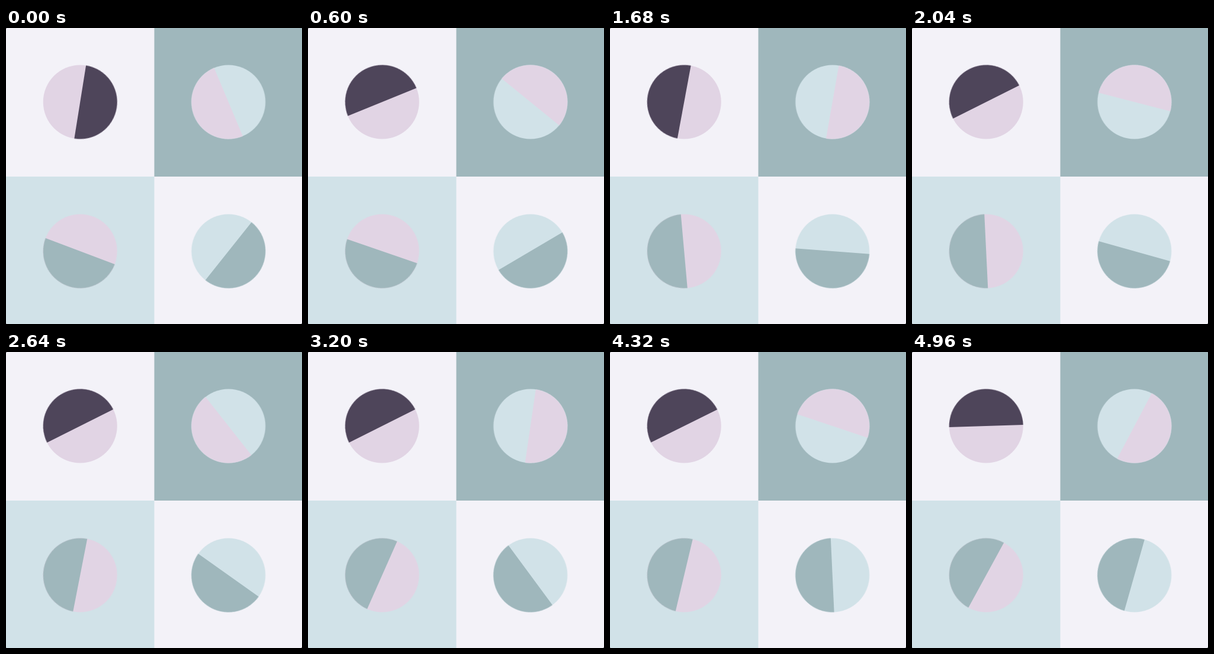
An HTML page without scripts that plays this animation: 500 px wide and 500 px high, repeating every 5000 ms.

```html
<!DOCTYPE html>
<html lang="en">
<head>
<meta charset="utf-8">
<title>Four turning discs</title>
<style>
  html, body { margin: 0; width: 100%; height: 100%; overflow: hidden; background: #4a4a4e; }
  svg { display: block; width: 100vw; height: 100vh; border-radius: 2px; }

  .snow  { fill: #f3f2f8; }
  .teal  { fill: #9fb7bc; }
  .ice   { fill: #d1e2e8; }
  .plum  { fill: #4e455a; }
  .lilac { fill: #e1d4e4; }

  /* Each disc sets its own headings; all share one timeline. */
  .half { animation: turn 5s linear infinite; }
  @keyframes turn {
    0%          { transform: rotate(var(--a)); }
    12%         { transform: rotate(var(--b)); }
    26.4%       { transform: rotate(var(--c)); }
    40.8%       { transform: rotate(var(--d)); }
    64%         { transform: rotate(var(--e)); }
    74.4%       { transform: rotate(var(--f)); }
    99.2%, 100% { transform: rotate(var(--g)); }
  }
  #nw { --a: 8.7deg; --b: 247.5deg; --c: 497.3deg; --d: 603.4deg; --e: 603.4deg; --f: 580.5deg; --g: 628.2deg; }
  #ne { --a: 157.6deg; --b: -50.6deg; --c: -264.5deg; --d: -435.2deg; --e: -711.3deg; --f: -906.4deg; --g: -1412.2deg; }
  #sw { --a: 110.8deg; --b: 109deg; --c: 172.6deg; --d: 177.2deg; --e: 203.9deg; --f: 179.1deg; --g: 208.6deg; }
  #se { --a: 38.5deg; --b: 59.4deg; --c: 82.7deg; --d: 105.7deg; --e: 143.5deg; --f: 160deg; --g: 195.8deg; }
</style>
</head>
<body>
<svg viewBox="0 0 500 500">
  <defs>
    <circle id="disc" r="62.5"/>
    <path id="half" d="M0-62.5a62.5 62.5 0 0 1 0 125z"/>
  </defs>

  <rect class="snow" width="500" height="500"/>
  <rect class="teal" x="250.5" width="249.5" height="251"/>
  <rect class="ice" y="251" width="250.5" height="249"/>

  <g id="nw" transform="translate(125.25 125)">
    <use href="#disc" class="lilac"/>
    <g class="half plum"><use href="#half"/></g>
  </g>
  <g id="ne" transform="translate(375.75 125)">
    <use href="#disc" class="ice"/>
    <g class="half lilac"><use href="#half"/></g>
  </g>
  <g id="sw" transform="translate(125.25 377)">
    <use href="#disc" class="lilac"/>
    <g class="half teal"><use href="#half"/></g>
  </g>
  <g id="se" transform="translate(375.75 377)">
    <use href="#disc" class="ice"/>
    <g class="half teal"><use href="#half"/></g>
  </g>
</svg>
</body>
</html>
```
